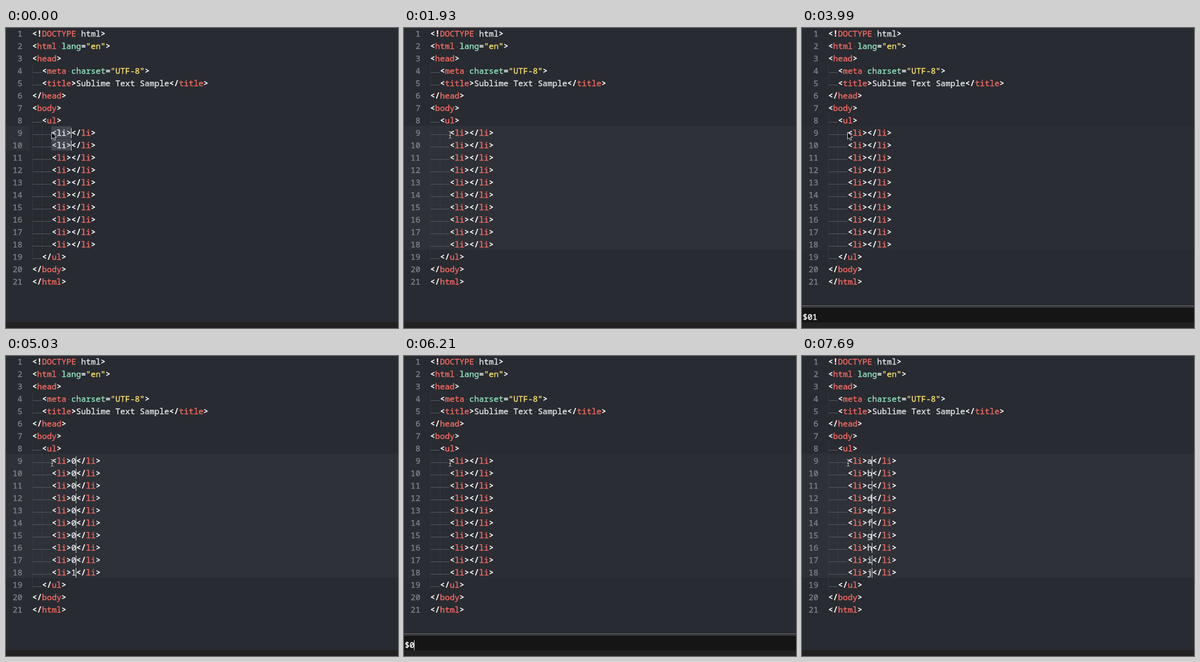
Recreate the animation shown at these times as an HTML page with a canvas. Size 820 by 629 pixels, loop 7990 ms.

```html
<!DOCTYPE html>
<html lang="en">
<head>
<meta charset="UTF-8">
<title>Multiple carets</title>
<style>
  html, body { margin: 0; width: 100%; height: 100%; overflow: hidden; background: #282b31; }
  canvas { display: block; }
</style>
</head>
<body>
<canvas id="stage" width="820" height="629"></canvas>
<script>
const ctx = document.getElementById('stage').getContext('2d');
const LOOP = 7990, ROW = 26, SIZE = 17.06, ADV = SIZE * .6, LEFT = 54.7, FIRST = 9, ITEMS = 10;
const FAMILY = SIZE + 'px "Noto Sans Mono", "DejaVu Sans Mono", monospace';
const C = {
  bg: '#282b31', band: '#2e3137', dimBand: '#2a2d33', select: '#42464e', number: '#7c7f85',
  punct: '#ffffff', tag: '#ee685f', attr: '#90e0bb', string: '#f6da66',
  text: '#dcdfe3', mark: '#5d6066', dot: '#4b4e55', guide: '#43474e',
  status: '#222222', panel: '#151515'
};

// Each step: start time and the properties that change then.
const steps = [
  [0, { sel: 2, inner: '', col: 8, caret: 1, panel: null, arrow: true }],
  [140, { sel: 3 }], [290, { sel: 4 }], [440, { sel: 5 }],
  [590, { sel: 7 }], [740, { sel: 8 }], [890, { sel: 9 }], [1180, { sel: 10 }],
  [1330, { sel: 0, arrow: false }],
  [1780, { caret: .5 }], [1930, { caret: 0 }],
  [2370, { panel: '$0', caret: 1 }],
  [2670, { caret: .5 }], [2820, { caret: 0 }], [3400, { caret: 1 }],
  [3550, { panel: '$01' }],
  [3840, { caret: .5 }], [3990, { caret: 0, arrow: true }],
  [4140, { panel: null, inner: 'pair', col: 10, caret: 1, arrow: false }],
  [4440, { caret: .5 }], [4580, { caret: 0 }],
  [5030, { inner: 'digit', col: 9, caret: 1 }],
  [5180, { inner: '', col: 8 }],
  [5620, { caret: .5 }], [5760, { caret: 0 }],
  [6210, { panel: '$0', caret: 1 }],
  [6510, { caret: .5 }], [6660, { caret: 0 }],
  [7100, { panel: '$', caret: 1 }],
  [7390, { panel: '$a' }],
  [7690, { panel: null, inner: 'letter', col: 9 }]
];

const inners = {
  '': () => '',
  pair: i => String(i + 1).padStart(2, '0'),
  digit: i => String(i + 1).padStart(2, '0')[0],
  letter: i => String.fromCharCode(97 + i)
};

const head = [
  '<!DOCTYPE html>', '<html lang="en">', '<head>', '  <meta charset="UTF-8">',
  '  <title>Sublime Text Sample</title>', '</head>', '<body>', '  <ul>'
];
const tail = ['  </ul>', '</body>', '</html>'];

const rowTop = n => (n - 1) * ROW - 3;

function stateAt(t) {
  const s = {};
  for (const [start, change] of steps) if (t >= start) Object.assign(s, change);
  return s;
}

function rect(color, x, y, w, h) {
  ctx.fillStyle = color;
  ctx.fillRect(x, y, w, h);
}

// Regular glyphs get a hairline outline for a medium weight.
function write(str, x, y, color, bold = false) {
  ctx.font = (bold ? '700 ' : '400 ') + FAMILY;
  ctx.fillStyle = ctx.strokeStyle = color;
  ctx.fillText(str, x, y);
  if (bold) return;
  ctx.lineWidth = .5;
  ctx.strokeText(str, x, y);
}

function drawCaret(x, y, alpha) {
  ctx.globalAlpha = alpha;
  rect('#f8f8f0', Math.floor(x), y, 1, 21);
  ctx.globalAlpha = 1;
}

function drawGuide(x, from, to) {
  for (let y = rowTop(from); y < rowTop(to + 1); y += 2) rect(C.guide, x, y, 1, 1);
}

function drawLine(line, n, selected) {
  const top = rowTop(n), base = top + 21;
  const indent = line.search(/\S/);
  for (let col = 0; col < indent; col += 2)
    rect(C.mark, Math.round(LEFT + col * ADV) + 1, top + 18, 19, 1);

  let inTag = false, opened = false;
  for (const m of line.matchAll(/<[!\/]?|>|=|"[^"]*"|[^<>="\s]+|\s/g)) {
    const tok = m[0], x = LEFT + m.index * ADV;
    if (tok === ' ') {
      if (m.index >= indent) rect(C.dot, Math.round(x + 4), top + 15, 2, 2);
      continue;
    }
    const bracket = /^[<>]/.test(tok);
    let color = C.text;
    if (bracket || tok === '=') color = C.punct;
    else if (tok[0] === '"') color = C.string;
    else if (opened) color = C.tag;
    else if (inTag && n > 1) color = C.attr;
    if (selected && m.index < 8) color = C.text;
    write(tok, x, base, color, bracket);
    opened = tok[0] === '<';
    if (bracket) inTag = opened;
  }
}

function drawArrow() {
  ctx.beginPath();
  [[95.5, 218.5], [95.5, 233], [98.8, 230], [101.2, 235.5], [103.6, 234.5],
   [101.2, 229.2], [105.6, 229.2]].forEach(p => ctx.lineTo(...p));
  ctx.closePath();
  ctx.fillStyle = '#000';
  ctx.strokeStyle = '#fff';
  ctx.lineWidth = 1;
  ctx.fill();
  ctx.stroke();
}

function drawBeam() {
  const path = () => {
    ctx.beginPath();
    ctx.moveTo(93.5, 216.5);
    ctx.quadraticCurveTo(96.5, 216.5, 96.5, 219);
    ctx.lineTo(96.5, 229);
    ctx.quadraticCurveTo(96.5, 231.5, 93.5, 231.5);
    ctx.moveTo(99.5, 216.5);
    ctx.quadraticCurveTo(96.5, 216.5, 96.5, 219);
    ctx.moveTo(96.5, 229);
    ctx.quadraticCurveTo(96.5, 231.5, 99.5, 231.5);
    ctx.moveTo(94.5, 225.5);
    ctx.lineTo(98.5, 225.5);
    ctx.stroke();
  };
  ctx.strokeStyle = '#16181b';
  ctx.lineWidth = 2.6;
  path();
  ctx.strokeStyle = '#f4f4f4';
  ctx.lineWidth = 1;
  path();
}

function drawPanel(text, caret) {
  rect('#8b8c8e', 0, 582, 820, 1);
  rect('#232425', 0, 583, 820, 4);
  rect('#4a4b4d', 0, 585, 820, 1);
  rect(C.panel, 0, 587, 820, 30);
  write(text, 1.4, 612, '#fff');
  drawCaret(1.4 + text.length * ADV, 596, caret);
}

function draw(t) {
  const s = stateAt(t), top = rowTop(FIRST);
  const items = Array.from({ length: ITEMS }, (_, i) => '    <li>' + inners[s.inner](i) + '</li>');
  const lines = [...head, ...items, ...tail];

  rect(C.bg, 0, 0, 820, 629);
  if (s.sel) rect(C.band, 0, top, 50, s.sel * ROW);
  else rect(s.panel === null ? C.band : C.dimBand, 0, top, 820, ITEMS * ROW);

  ctx.fillStyle = C.select;
  for (let i = 0; i < s.sel; i++) {
    ctx.beginPath();
    ctx.roundRect(95, top + i * ROW + 1, 42, 25, 2);
    ctx.fill();
  }

  drawGuide(55, 4, 5);
  drawGuide(55, 8, 19);
  drawGuide(75, 9, 18);

  lines.forEach((line, i) => {
    const n = i + 1;
    ctx.textAlign = 'right';
    write(String(n), 34.2, rowTop(n) + 21, C.number);
    ctx.textAlign = 'left';
    drawLine(line, n, n >= FIRST && n < FIRST + s.sel);
  });

  if (s.panel === null)
    for (let i = 0; i < (s.sel || ITEMS); i++)
      drawCaret(LEFT + s.col * ADV, top + i * ROW + 5, s.caret);
  else drawPanel(s.panel, s.caret);

  rect(C.status, 0, 617, 820, 12);
  s.arrow ? drawArrow() : drawBeam();
}

const began = performance.now();
function tick() {
  draw((performance.now() - began) % LOOP);
  requestAnimationFrame(tick);
}
tick();
</script>
</body>
</html>
```
